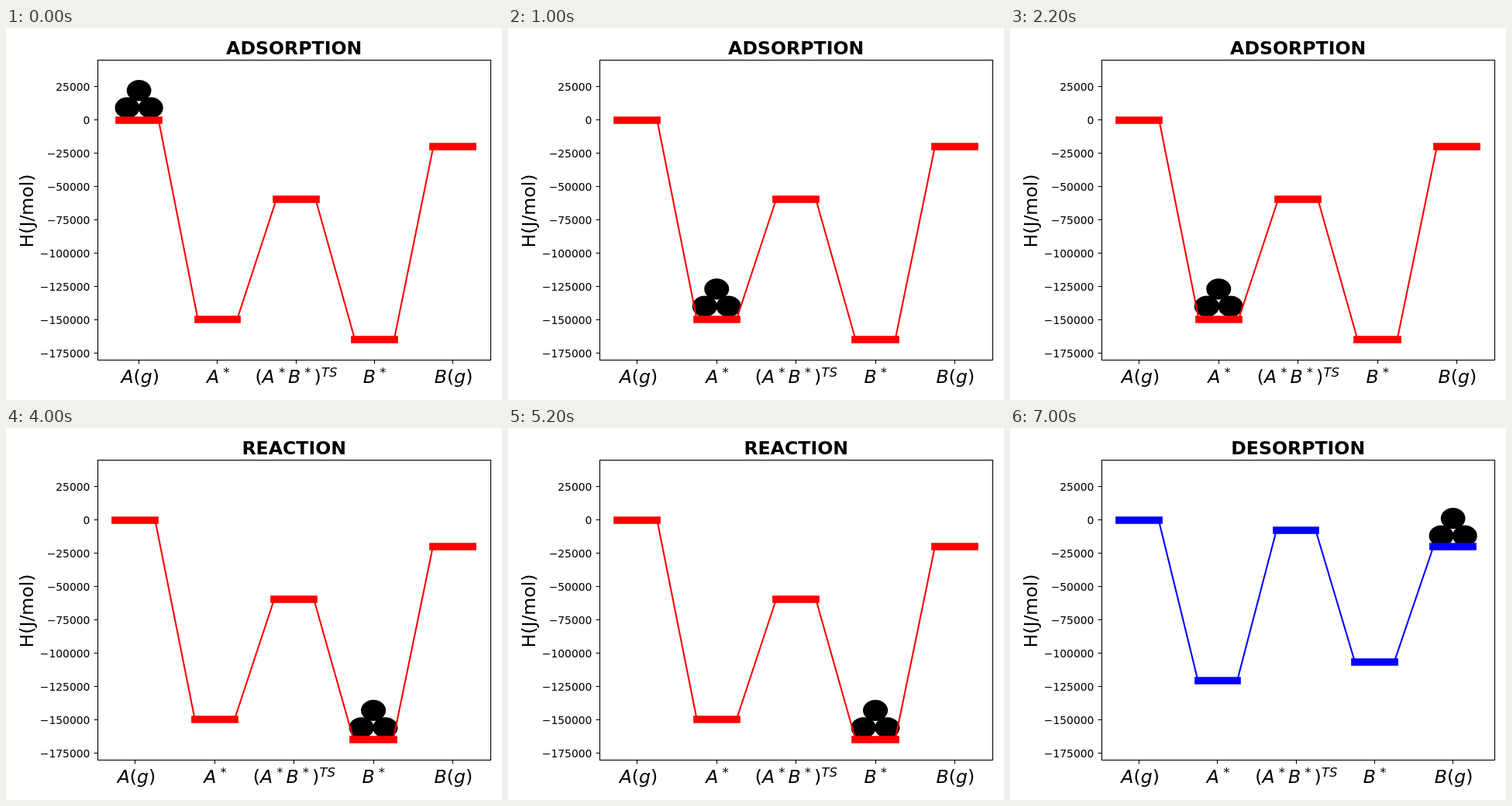
An HTML page that plays this animation: 640x480 px, repeating every 8 s.

```html
<!DOCTYPE html>
<html lang="en">
<head>
<meta charset="utf-8">
<title>Reaction energy profile</title>
<style>
  html, body { margin: 0; width: 100%; height: 100%; overflow: hidden; background: #fff; }
  svg { display: block; width: 100vw; height: 100vh; }
  text { font-family: "DejaVu Sans", sans-serif; font-size: 23.61px; white-space: pre; }
  .tick { font-size: 13.89px; text-anchor: end; }
  .mid { text-anchor: middle; }
  .sup { font-size: 16.53px; }
  .it { font-style: italic; }
  .axis { fill: none; stroke: #000; stroke-width: 1.11; }
</style>
</head>
<body>
<svg id="stage" viewBox="0 0 640 480"></svg>
<script>
const NS = "http://www.w3.org/2000/svg";
const stage = document.getElementById("stage");
const LOOP = 8000, LEFT = 118.2, WIDTH = 506.9, ZERO = 118.4, SCALE = 0.00172;

function add(parent, tag, attrs, text) {
  const el = document.createElementNS(NS, tag);
  for (const k in attrs) el.setAttribute(k, attrs[k]);
  if (text) el.textContent = text;
  parent.appendChild(el);
  return el;
}
const set = (el, attrs) => { for (const k in attrs) el.setAttribute(k, attrs[k]); };
const yOf = joule => ZERO - joule * SCALE;

// Bar heights on the stage for the two energy profiles
const RED = { color: "#f00", levels: [119, 376, 221, 402, 153] };
const BLUE = { color: "#00f", levels: [119, 326, 132, 302, 153] };

// site: column of the molecule, top: enthalpy at its upper atom
const STEPS = [
  { at: 0,    title: "ADSORPTION", path: RED,  site: 0, top: 22000 },
  { at: 1000, title: "ADSORPTION", path: RED,  site: 1, top: -127000 },
  { at: 3000, title: "REACTION",   path: RED,  site: 2, top: -38000 },
  { at: 4000, title: "REACTION",   path: RED,  site: 3, top: -143000 },
  { at: 6000, title: "DESORPTION", path: BLUE, site: 3, top: -85000 },
  { at: 7000, title: "DESORPTION", path: BLUE, site: 4, top: 1000 }
];

// Label pieces: [text, x offset from the column centre, class]
const LABELS = [
  [["A", -23.2, "it"], ["(", -7.1], ["g", 2.1, "it"], [")", 17.1]],
  [["A", -14, "it"], ["*", 7.3, "sup"]],
  [["(", -52.8], ["A", -43.6, "it"], ["*", -22.3, "sup"], ["B", -10.2, "it"],
   ["*", 11.2, "sup"], [")", 23.3], ["TS", 32.8, "it sup"]],
  [["B", -14.6, "it"], ["*", 6.8, "sup"]],
  [["B", -23.9, "it"], ["(", -7.7], ["g", 1.5, "it"], [")", 16.5]]
];

add(stage, "rect", { width: 640, height: 480, fill: "#fff" });
const atoms = [0, 1, 2].map(() =>
  add(stage, "ellipse", { ry: 7500 * SCALE, stroke: "#000", "stroke-width": 1.39 }));
const links = add(stage, "path", { fill: "none", "stroke-width": 2.08 });
const bars = add(stage, "path", { fill: "none", "stroke-width": 9.72, "stroke-linecap": "square" });

add(stage, "rect", { class: "axis", x: 118.5, y: 41.5, width: 507, height: 387 });
for (let v = 25000; v >= -175000; v -= 25000) {
  const y = yOf(v);
  add(stage, "path", { class: "axis", d: `M113.6 ${Math.floor(y) + 0.5}H118.5` });
  add(stage, "text", { class: "tick", x: 108.4, y: y + 5.4 }, String(v).replace("-", "\u2212"));
}
add(stage, "text", { class: "mid", transform: "translate(35 236) rotate(-90)" }, "H(J/mol)");
const title = add(stage, "text", { class: "mid", x: 371.7, y: 34, "font-weight": "bold" });

const columns = LABELS.map(parts => {
  const g = add(stage, "g", {});
  for (const [text, x, cls = ""] of parts)
    add(g, "text", { class: cls, x, y: cls.includes("sup") ? 449.5 : 458 }, text);
  return { label: g, tick: add(stage, "path", { class: "axis" }) };
});

function draw(step) {
  const { path, site } = step;
  // The horizontal range widens when the molecule overhangs an end bar
  const lo = Math.min(-0.25, site - 0.3), hi = Math.max(4.25, site + 0.3);
  const unit = WIDTH / ((hi - lo) * 1.1);
  const xOf = v => LEFT + (v - lo + (hi - lo) * 0.05) * unit;

  let barPath = "", linkPath = "";
  path.levels.forEach((y, i) => {
    const x = xOf(i);
    barPath += `M${Math.round(xOf(i - 0.25))} ${y}H${Math.round(xOf(i + 0.25))}`;
    if (i < 4) linkPath += `M${xOf(i + 0.25)} ${y}L${xOf(i + 0.75)} ${path.levels[i + 1]}`;
    set(columns[i].label, { transform: `translate(${x} 0)` });
    set(columns[i].tick, { d: `M${Math.floor(x) + 0.5} 428.5v4.9` });
  });
  set(bars, { d: barPath, stroke: path.color });
  set(links, { d: linkPath, stroke: path.color });

  atoms.forEach((atom, i) => set(atom, {
    cx: xOf(site + (i - 1) * 0.15),
    cy: yOf(step.top - (i === 1 ? 0 : 13000)),
    rx: 0.15 * unit
  }));
  title.textContent = step.title;
}

let shown;
const start = performance.now();
function tick() {
  const t = (performance.now() - start) % LOOP;
  const step = STEPS.findLast(s => t >= s.at);
  if (step !== shown) draw(shown = step);
  requestAnimationFrame(tick);
}
tick();
</script>
</body>
</html>
```
